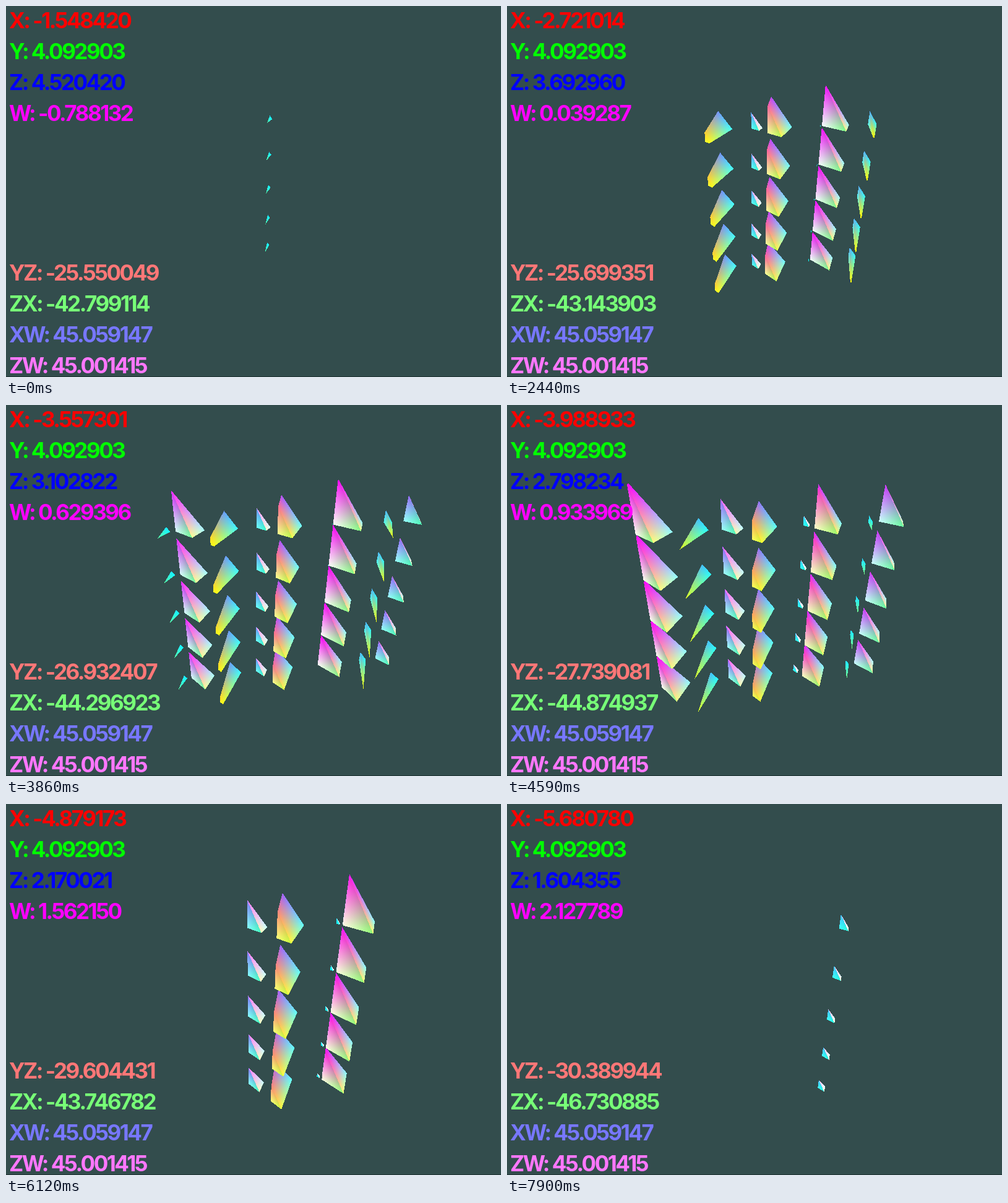
Animation, 800 px wide and 600 px high, one loop 8310 ms. Source, as an HTML page with a canvas:

```html
<!DOCTYPE html>
<html lang="en">
<head>
<meta charset="utf-8">
<title>4D lattice slice</title>
<style>
  html, body { margin: 0; width: 100%; height: 100%; overflow: hidden; background: #334d4d; }
  canvas { display: block; }
</style>
</head>
<body>
<canvas id="stage" width="800" height="600"></canvas>
<script>
const W = 800, H = 600, LOOP = 8310;
const FOCAL = 541, BASE_Z = -3, RAD = Math.PI / 180;

// the camera glides along the slice normal, in steps, with one pause
const START = [-1.548420, 4.092903, 4.520420, -0.788132];
const TRAVEL = 5.838016, STEP = 46.37, FIRST_STEP = 460;
const GLIDE = { from: 392, pause: 7330, resume: 7714, rest: 165 };

// where the mouse turned the view: time, pitch (YZ), yaw (ZX)
const LOOK = [
  [413, -25.550049, -42.799114],
  [1712, -25.273018, -42.568901],
  [3103, -26.125635, -43.718838],
  [4587, -27.739157, -44.874992],
  [5468, -28.255802, -43.902],
  [6117, -29.604349, -43.746471],
  [7460, -30.389944, -46.730885]
];

// slice axes: the x, z and w axes turned by XW, then by ZW
const XW = 45.059147, ZW = 45.001415;
const sa = Math.sin(XW * RAD), ca = Math.cos(XW * RAD);
const sb = Math.sin(ZW * RAD), cb = Math.cos(ZW * RAD);
const RIGHT = [ca, 0, -sa * sb, sa * cb];
const BACK = [0, 0, cb, sb];
const NORMAL = [-sa, 0, -ca * sb, ca * cb];

const WHITE = [255, 255, 255], CYAN = [0, 255, 255];
const MAGENTA = [255, 0, 255], YELLOW = [255, 255, 0];

// corner simplex: the origin and the four unit vectors
const O = [0, 0, 0, 0];
const [EX, EY, EZ, EW] = O.map((_, i) => O.map((_, k) => +(i === k)));

// the boundary cells that can face the camera; q is the camera relative to the simplex
const CELLS = [
  { seen: q => q[0] < 0, verts: [O, EY, EZ, EW], tints: [WHITE, MAGENTA, YELLOW, CYAN] },
  { seen: q => q[3] < 0, verts: [O, EX, EY, EZ], tints: [WHITE, CYAN, MAGENTA, YELLOW] },
  { seen: q => q[0] + q[1] + q[2] + q[3] > 1, verts: [EX, EY, EZ, EW], tints: [CYAN, MAGENTA, YELLOW, WHITE] }
];

const ctx = document.getElementById('stage').getContext('2d');
const image = ctx.createImageData(W, H);
const pixels = new Uint32Array(image.data.buffer);
const mix = (a, b, k) => a.map((v, i) => v + (b[i] - v) * k);
const dot = (a, b) => a.reduce((sum, v, i) => sum + v * b[i], 0);
const clamp = (v, lo, hi) => Math.min(hi, Math.max(lo, v));

function stateAt(time) {
  const t = time < FIRST_STEP ? 0 : FIRST_STEP + Math.floor((time - FIRST_STEP) / STEP) * STEP;
  const first = GLIDE.pause - GLIDE.from;
  const active = clamp(t - GLIDE.from, 0, first) + clamp(t - GLIDE.resume, 0, GLIDE.rest);
  const travel = TRAVEL * active / (first + GLIDE.rest);

  let i = 1;
  while (i < LOOK.length - 1 && t >= LOOK[i][0]) i++;
  const a = LOOK[i - 1], b = LOOK[i];
  const [, pitch, yaw] = mix(a, b, clamp((t - a[0]) / (b[0] - a[0]), 0, 1));
  return { pos: START.map((v, k) => v + NORMAL[k] * travel), pitch, yaw };
}

function makeProjector({ pitch, yaw }) {
  const cp = Math.cos(pitch * RAD), sp = -Math.sin(pitch * RAD);
  const cy = Math.cos(yaw * RAD), sy = Math.sin(yaw * RAD);
  return q => {
    const u = dot(q, RIGHT), t = dot(q, BACK);
    const side = u * cy - t * sy, ahead = -u * sy - t * cy;
    const depth = ahead * cp - q[1] * sp;
    const up = q[1] * cp + ahead * sp;
    return { x: W / 2 + FOCAL * side / depth, y: H / 2 - FOCAL * up / depth, depth };
  };
}

function fillTriangle(a, b, c) {
  const area = (b.x - a.x) * (c.y - a.y) - (b.y - a.y) * (c.x - a.x);
  if (Math.abs(area) < 1e-6) return;
  const x0 = Math.max(0, Math.floor(Math.min(a.x, b.x, c.x)));
  const x1 = Math.min(W - 1, Math.ceil(Math.max(a.x, b.x, c.x)));
  const y0 = Math.max(0, Math.floor(Math.min(a.y, b.y, c.y)));
  const y1 = Math.min(H - 1, Math.ceil(Math.max(a.y, b.y, c.y)));
  for (let y = y0; y <= y1; y++) {
    for (let x = x0; x <= x1; x++) {
      const px = x + 0.5 - a.x, py = y + 0.5 - a.y;
      const kb = (px * (c.y - a.y) - py * (c.x - a.x)) / area;
      const kc = (py * (b.x - a.x) - px * (b.y - a.y)) / area;
      const ka = 1 - kb - kc;
      if (ka < 0 || kb < 0 || kc < 0) continue;
      const ch = i => ka * a.tint[i] + kb * b.tint[i] + kc * c.tint[i] + 0.5 | 0;
      pixels[y * W + x] = (255 << 24 | ch(2) << 16 | ch(1) << 8 | ch(0)) >>> 0;
    }
  }
}

// cut one tetrahedral cell with the slice and paint the polygon
function drawCell(cell, base, project) {
  const above = [], below = [];
  cell.verts.forEach((v, i) => {
    const q = base.map((b, k) => b + v[k]);
    const p = { q, d: dot(q, NORMAL), tint: cell.tints[i] };
    (p.d > 0 ? above : below).push(p);
  });
  const poly = [];
  above.forEach((a, i) => {
    const others = i % 2 ? [...below].reverse() : below;
    for (const b of others) {
      const k = a.d / (a.d - b.d);
      poly.push({ ...project(mix(a.q, b.q, k)), tint: mix(a.tint, b.tint, k) });
    }
  });
  for (let i = 2; i < poly.length; i++) fillTriangle(poly[0], poly[i - 1], poly[i]);
}

function drawLattice(state) {
  const project = makeProjector(state);
  const found = [];
  for (let x = -2; x <= 2; x++) {
    for (let w = -2; w <= 2; w++) {
      for (let y = -2; y <= 2; y++) {
        const base = [x, y, BASE_Z, w].map((v, i) => v - state.pos[i]);
        if (Math.abs(dot(base, NORMAL)) < sa) found.push({ base, depth: project(base).depth });
      }
    }
  }
  found.sort((a, b) => b.depth - a.depth);
  for (const { base } of found) {
    const eye = base.map(v => -v);
    for (const cell of CELLS) if (cell.seen(eye)) drawCell(cell, base, project);
  }
}

function draw(time) {
  const state = stateAt(time);
  pixels.fill(0xff4d4d33);
  pixels.fill(0xff33331f, W * (H - 1));
  drawLattice(state);
  ctx.putImageData(image, 0, 0);

  const [x, y, z, w] = state.pos;
  ctx.font = '700 35px Inter, sans-serif';
  ctx.letterSpacing = '-2.5px';
  [
    ['X', x, '#ff0000'], ['Y', y, '#00ff00'], ['Z', z, '#0000ff'], ['W', w, '#ff00ff'],
    ['YZ', state.pitch, '#ff7777'], ['ZX', state.yaw, '#77ff77'],
    ['XW', XW, '#7777ff'], ['ZW', ZW, '#ff77ff']
  ].forEach(([name, value, color], i) => {
    ctx.fillStyle = color;
    ctx.fillText(`${name}: ${value.toFixed(6)}`, 5, (i < 4 ? 36 : 244) + i * 50);
  });
}

const start = performance.now();
function tick() {
  draw((performance.now() - start) % LOOP);
  requestAnimationFrame(tick);
}
tick();
</script>
</body>
</html>
```
